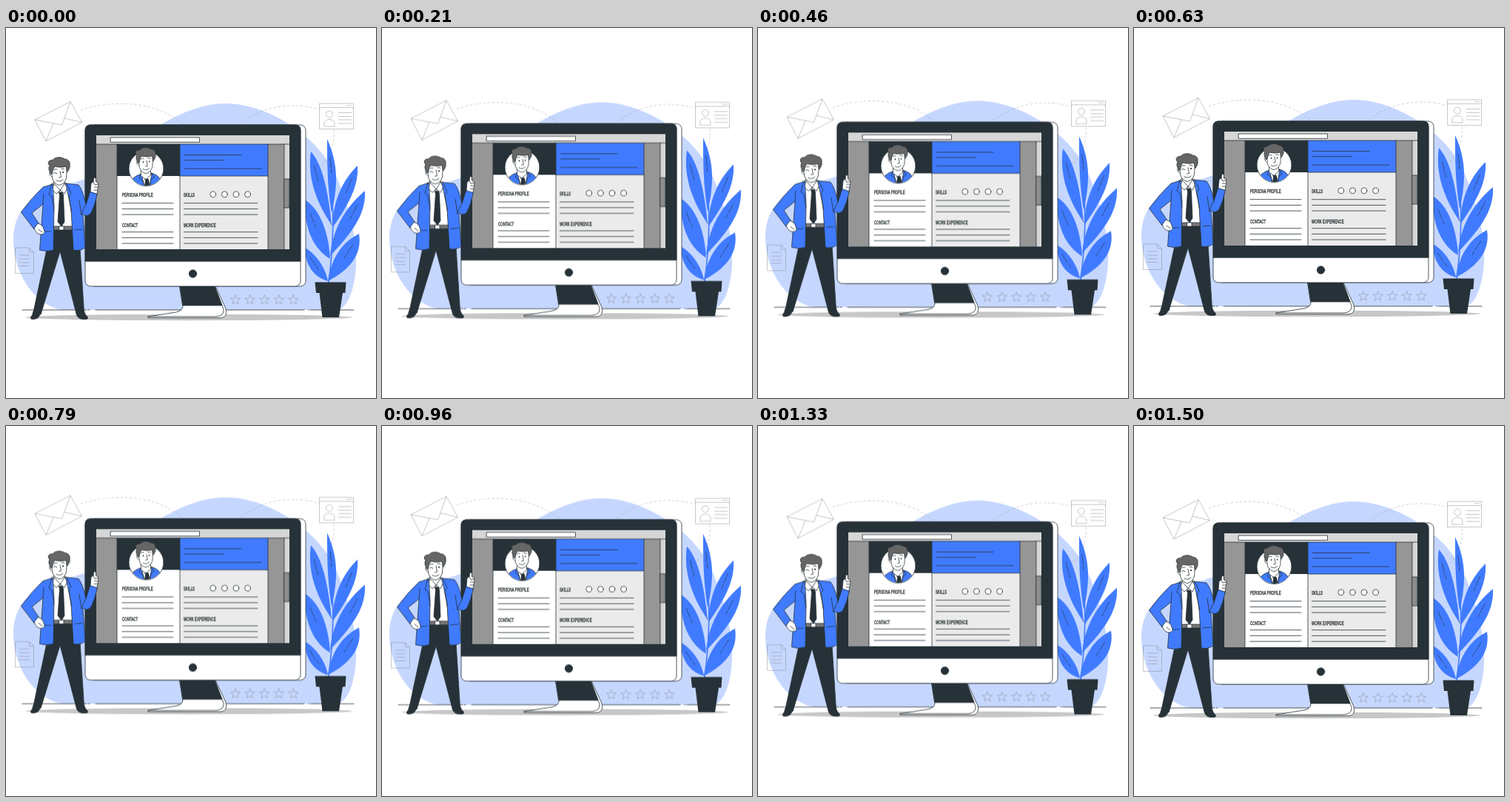
Animation, 500 px wide and 500 px high, one loop 1.54 s. Source, as an HTML page:

```html
<!DOCTYPE html>
<html lang="en">
<head>
<meta charset="utf-8">
<title>Persona profile</title>
<style>
html, body { margin: 0; width: 100%; height: 100%; overflow: hidden; background: #fff; }
svg { display: block; width: 100vw; height: 100vh; }
.ink { fill: none; stroke: #263238; stroke-width: .8; stroke-linecap: round; stroke-linejoin: round; }
.dark { fill: #263238; }
.blue { fill: #407bff; }
.white { fill: #fff; }
.pale { fill: none; stroke: #777; stroke-opacity: .5; stroke-width: .8; stroke-linejoin: round; }
.dash { stroke-dasharray: 3.5 2.6; stroke-opacity: .4; }
.rib { stroke-width: .6; stroke-dasharray: 14 2.5 5 60; }
text { font: 7.6px "Liberation Sans", Arial, sans-serif; fill: #1c2529; stroke: #1c2529; stroke-width: .3; }
</style>
</head>
<body>
<svg viewBox="0 0 500 500">
<defs>
  <clipPath id="disc"><circle cx="189.5" cy="190" r="23"/></clipPath>
  <g id="head" class="ink">
    <path class="white" d="M65 206V216L72 221L79 215V208"/>
    <path class="white" d="M62 188L62.500 203Q65 211 72 212.500Q79 211 81.500 203L82.500 187Q73 182 62 188Z"/>
    <path class="white" d="M62 195C58 192 57 200 62.500 201"/>
    <path fill="#666" d="M61 198C58 193 57 189 59 186C55 182 58 178 63 178.500C66 174 75 173.500 79 177C84 177 87 181 86 185C87 189 84 193 82.500 195L81 187C76 189 69 188 66 187Q63.500 190 62.500 196Z"/>
    <path d="M73 193.500L74.500 201.500L71.500 202M68 206Q73 209 77 205M65 191.500Q67 190 69 191M75 190.500Q77 189.500 79 191"/>
  </g>
</defs>
<g id="scene">
  <path fill="#c6d7ff" d="M75 381C40 374 11 335 10 288C10 232 52 219 98 207C155 188 181 143 219 125C247 110 271 102 298 102C345 102 408 135 440 187C466 240 480 303 470 345Q464 374 450 381Z"/>

  <g class="pale">
    <path class="dash" d="M101 111C136 99 198 94 240 131M318 129C350 102 395 101 423 110M443 138C445 165 433 189 408 195"/>
    <path d="M39 124L87 99.500L102.500 127.500L54 153ZM39 124L75.500 131L87 99.500M54 153L64 129M102.500 127.500L79 122"/>
    <path d="M423.500 102H469.500V136.500H423.500ZM423.500 107.500H469.500M460 104.800H467M449 114.500H467M449 119.500H467M449 124H467M449 129H467"/>
    <path d="M430 133V128Q431 124 437 123.500Q443 124 444 128V133Z"/>
    <circle cx="437" cy="116.500" r="4.500"/>
    <path d="M12.500 297H31.500L37.500 303V331.500H12.500ZM31.500 297V303H37.500M18 307H32M18 312H32M18 317H32M18 321.500H32"/>
    <g id="stars"></g>
  </g>

  <ellipse cx="247" cy="391" rx="221" ry="4.200" fill="#c7c7c7"/>
  <path class="ink" d="M22 381H109M111 381H113M121 381H403M409 381H410M412 381H470"/>

  <g id="plant"></g>
  <path class="dark" d="M417.500 343.500H459.500L458.500 358H455L450 391H427.500L423.500 358H419Z"/>

  <g class="ink">
    <path class="white" d="M235 349H283L297 379Q300 391 290 391.800H192V390L230 384Q239 382 239 376Z"/>
    <path class="dark" d="M235 349H282L292 375H239Z"/>
    <path d="M192 390H284Q295 389 294 380L282 349"/>
    <rect class="white" x="113" y="131" width="292" height="218" rx="7"/>
    <rect class="white" x="107" y="131" width="291" height="218" rx="7"/>
    <path class="dark" d="M107 315V138Q107 131 114 131H391Q398 131 398 138V315Z"/>
    <circle class="dark" cx="252.500" cy="332" r="5.200"/>
  </g>

  <rect x="122" y="145" width="261" height="154" fill="#d6d6d6"/>
  <rect x="122" y="157" width="254" height="142" fill="#969696"/>
  <rect class="white" x="150" y="157" width="85" height="142"/>
  <rect x="235" y="157" width="119" height="142" fill="#ebebeb"/>
  <rect class="dark" x="150" y="157" width="85" height="43"/>
  <rect class="blue" x="235" y="157" width="119" height="43"/>
  <g class="ink">
    <rect class="white" x="141.500" y="148" width="120" height="6.300"/>
    <path d="M122 157H383M150 157V299M235 157V299M354 157V299M376 157V299M235 200H354"/>
    <rect x="376" y="204" width="7" height="39" fill="#8c8c8c"/>
    <path d="M241.500 171.500H318M241.500 178.700H294M241.500 190H345"/>
    <g id="rows"></g>
    <g id="dots"></g>
  </g>
  <g id="labels"></g>

  <circle class="ink" cx="189.500" cy="190" r="23.500" style="fill:#fff"/>
  <g class="ink" clip-path="url(#disc)">
    <path class="blue" d="M168 216L172 203Q176 199 183 197L190 207L196 196Q205 198 208 204L211 216Z"/>
    <path class="white" d="M183 197L187 215H194L197 196L190 203Z"/>
    <path class="dark" d="M188 204H192L193 207L194 216H187L188.500 207Z"/>
    <path d="M183 197L180 203L185 206L187 214M197 196L200 202L196 205L194 214"/>
  </g>
  <use href="#head" transform="translate(122 -1) scale(.93)"/>
  <g class="dark"><circle cx="185.500" cy="181" r=".9"/><circle cx="193.500" cy="180.500" r=".9"/></g>

  <g class="ink">
    <path class="dark" d="M55 299L37 384L47 387L73 302L95 386L105.500 384L100 297L90 270H63Z"/>
    <path class="dark" d="M37 383Q36 388 33.500 391Q33 394 37 393.500Q44 393 45.500 388L47 386Z"/>
    <path class="dark" d="M95 386L96 389Q99 394 106 393.500Q111 394 110.500 391Q107 388 105.500 383Z"/>
    <path class="white" d="M60 212L66 208L79 209L87 213L90 269H62Z"/>
    <path d="M62 268H90V273H62Z" fill="#777"/>
    <path class="white" d="M72 268H78V273H72Z"/>
    <path class="dark" d="M71.500 222H76.500L77.500 226L79 262L75 268L70 262L72.500 226Z"/>
    <use href="#head"/>
    <path class="white" d="M65 211L62 218L68 224L73.500 219L79 224L83 216L79 210L73.500 219Z"/>
    <path class="blue" d="M63 211L50 215Q34 230 20.500 249L38 272L45 265L35 250L50 238L45.500 300Q55 303 64 300L65 240Z"/>
    <path class="blue" d="M81 210L98 212Q104 219 108 239L114 220L123.500 224Q120 240 115 250Q110 256 104 252L107 297Q99 302 91 300L88 245Z"/>
    <path d="M50 238L51 224M108 239Q104 244 102 253L99 233M48 275H61M93 273L103 272"/>
    <path d="M62 211L58 225L62 228L65 247M82 210L88 223L85 227L88 248"/>
    <path class="white" d="M38 271L43 264Q50 266 51 272Q54 278 48 279Q42 280 38 271Z"/>
    <path d="M44 272L49 276"/>
    <path class="white" d="M114 221L115 210Q117 208 118 208L118.500 203Q121 201 121.500 204V208Q125 208 125 212L123 224Z"/>
    <path d="M118 208L120 212L124.500 211M119.500 215H124M119 219H123"/>
    <path d="M64.500 196Q67 194.500 69 196.500"/>
    <circle class="dark" cx="77" cy="195" r=".7"/>
  </g>
</g>
</svg>
<script>
const NS = "http://www.w3.org/2000/svg";
const $ = id => document.getElementById(id);

function add(parent, tag, attrs) {
  const el = document.createElementNS(NS, tag);
  for (const key in attrs) el.setAttribute(key, attrs[key]);
  return parent.appendChild(el);
}

for (let i = 0; i < 5; i++) {
  const points = Array.from({ length: 10 }, (_, k) => {
    const r = k % 2 ? 3 : 7, a = k * Math.PI / 5;
    return [310 + i * 19.6 + r * Math.sin(a), 367.5 - r * Math.cos(a)];
  });
  add($("stars"), "polygon", { points: points.join(" ") });
}

for (const top of [236.7, 275.7])
  for (let i = 0; i < 3; i++)
    add($("rows"), "path", { d: `M157 ${top + i * 7.7}H226M240.5 ${top + i * 7.7}H340` });

for (let i = 0; i < 4; i++)
  add($("dots"), "circle", { class: "white", cx: 279.7 + i * 15.6, cy: 224.8, r: 3.9 });

// One condensed cut for every label.
const labels = [
  ["PERSONA PROFILE", 157, 228.3], ["SKILLS", 240, 228.3],
  ["CONTACT", 157, 269.3], ["WORK EXPERIENCE", 240, 269.3]
];
for (const [label, x, y] of labels)
  add($("labels"), "text", { transform: `translate(${x} ${y}) scale(.585 1)` }).textContent = label;

// Leaf: tip, two controls on one side, base, two controls on the other.
const leaves = [
  [434, 150, 434, 185, 434, 212, 440, 250, 448, 215, 450, 185],
  [412, 167, 426, 182, 435, 215, 440, 266, 414, 228, 408, 195],
  [475, 186, 458, 203, 442, 228, 441, 270, 462, 240, 477, 214],
  [485, 220, 464, 238, 442, 265, 438, 308, 464, 280, 487, 254],
  [404, 232, 424, 245, 436, 275, 438, 312, 410, 295, 403, 262],
  [477, 278, 456, 289, 440, 308, 435, 342, 462, 328, 482, 308],
  [404, 297, 420, 306, 432, 325, 435, 342, 414, 336, 404, 318]
];
const plant = $("plant");
add(plant, "path", { d: "M440 218Q445 275 436 344", fill: "none", stroke: "#407bff", "stroke-width": 1.6 });
for (const p of leaves) {
  const tip = p.slice(0, 2);
  add(plant, "path", { class: "blue", d: `M${tip}C${p.slice(2, 8)}C${p.slice(6)} ${tip}Z`.replace(/C([^C]*)C[^,]*,[^,]*,/, "C$1C") });
  const mid = i => (p[2 + i] + p[4 + i] + p[8 + i] + p[10 + i]) / 4;
  const start = i => p[i] * .5 + mid(i) * .5;
  add(plant, "path", { class: "ink rib", d: `M${start(0)} ${start(1)}Q${mid(0)} ${mid(1)} ${p[6]} ${p[7]}` });
}

// Linear float of 6 units up and back, held at 24 steps a second.
const LOOP = 1540, FLOAT = 1500, RISE = 6, RATE = 24;
const steps = Array.from({ length: 37 }, (_, k) => {
  const phase = k * 1000 / RATE / FLOAT;
  const lift = RISE * (1 - Math.abs(1 - 2 * phase));
  return {
    offset: Math.round(k * 100 / RATE) * 10 / LOOP,
    transform: `translateY(${-lift.toFixed(3)}px)`,
    easing: "step-end"
  };
});
steps.push({ offset: 1, transform: "translateY(0px)" });
$("scene").animate(steps, { duration: LOOP, iterations: Infinity });
</script>
</body>
</html>
```
